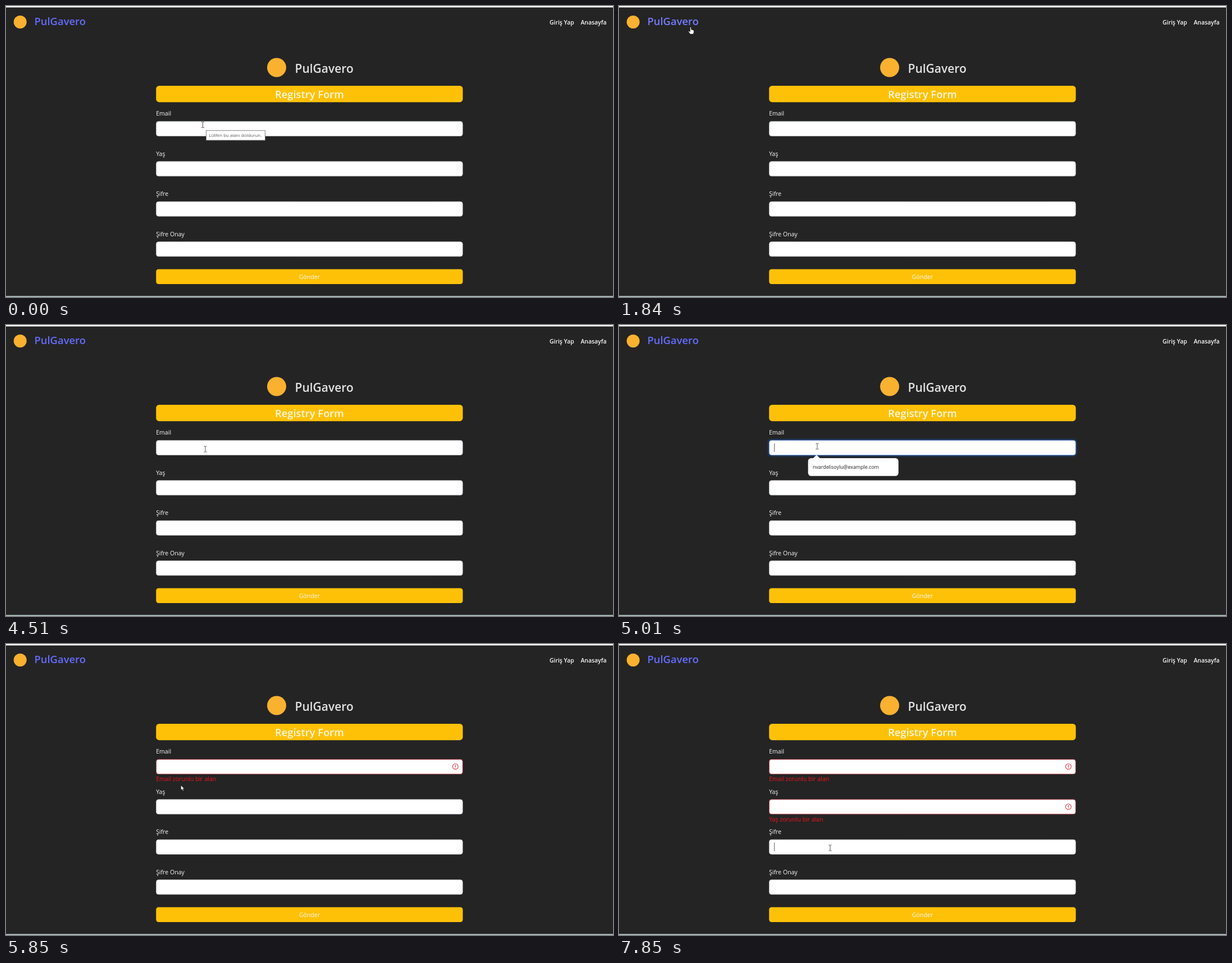
These frames come from a looping animation (1081x518 px, 8000 ms). An HTML page:

```html
<!DOCTYPE html>
<html lang="tr">
<head>
<meta charset="utf-8">
<title>Registry Form</title>
<style>
  html, body { margin: 0; width: 100%; height: 100%; overflow: hidden; background: #242424; }
  svg { display: block; width: 100%; height: 100%; }
  text { font-family: "Open Sans", "Noto Sans", sans-serif; font-size: 10.55px; fill: #f8f8f8; }
  .semi { font-weight: 600; }
  .mid { text-anchor: middle; }
  .error { fill: #f5121a; }
  .field { fill: #fff; stroke: #ced4da; stroke-width: .7; }
  .ring { fill: #1e3659; }
  .caret { stroke: #333; stroke-width: .8; }
  .bar { fill: #ffc107; }
  .coin { fill: #fbb130; }
</style>
</head>
<body>
<svg id="stage" viewBox="0 0 1081 518" preserveAspectRatio="none">
  <rect width="1081" height="518" fill="#242424"/>
  <rect width="1081" height="2.5" fill="#fff"/>
  <rect y="516" width="1081" height="2" fill="#a2b3b3"/>

  <circle class="coin" cx="25.2" cy="28.5" r="11.5"/>
  <text id="brand" class="semi" x="50.5" y="33.8" style="font-size:18.4px">PulGavero</text>
  <text class="semi" x="968" y="33" style="font-size:10.4px">Giriş Yap</text>
  <text class="semi" x="1023.5" y="33" style="font-size:10.4px">Anasayfa</text>

  <circle class="coin" cx="482" cy="109.5" r="17"/>
  <text class="semi" x="514.5" y="118.7" style="font-size:21px;fill:#e2e2e2">PulGavero</text>

  <rect class="bar" x="267.3" y="142" width="546.2" height="29.2" rx="5.5"/>
  <text class="semi mid" x="540.4" y="164.2" style="font-size:18.4px;fill:#fff8e0">Registry Form</text>

  <g id="form"></g>

  <rect class="bar" x="267.3" y="468.4" width="546.2" height="26.6" rx="4.2"/>
  <text class="mid" x="540.4" y="486.3">Gönder</text>

  <g id="tip">
    <rect x="356.5" y="221.7" width="105" height="17.3" fill="#fff" stroke="#767676" stroke-width=".9"/>
    <text x="361.3" y="233.3" style="font-size:7.95px;fill:#575757">Lütfen bu alanı doldurun.</text>
  </g>

  <g id="popup">
    <path d="M344.8 238l7-6.8 7 6.8z" fill="#fff"/>
    <rect x="336.7" y="237" width="161" height="31.8" rx="5.5" fill="#fff"/>
    <text x="345" y="256.2" style="font-size:8.85px;font-weight:500;fill:#1f1f1f">nvardelisoylu@example.com</text>
  </g>

  <g id="arrow" stroke-linejoin="round">
    <path d="M0 0V8.6L2 6.8 3.5 10 4.9 9.4 3.5 6.3H6.2Z" fill="#fff" stroke="#111" stroke-width=".6"/>
  </g>
  <g id="beam" fill="none" stroke="#444" stroke-width=".9">
    <path d="M-2.6 -5H-.6L0 -4.4 .6 -5H2.6M0 -4.4V4.4M-2.6 5H-.6L0 4.4 .6 5H2.6"/>
  </g>
  <g id="hand" stroke-linejoin="round">
    <path d="M-1 1Q0 -.8 1 1V4.6Q2 3.8 2.8 5 3.8 4.4 4.4 5.5 5.8 5.1 5.9 6.6V9.2L4.9 12.6H-.7L-3.8 8.2Q-3.9 6.6 -2.4 7.2L-1 8.4Z"
      fill="#fff" stroke="#111" stroke-width=".7"/>
  </g>
</svg>
<script>
const LOOP = 8000;
const $ = id => document.getElementById(id);

// start time, pointer kind, x, y
const pointer = [
  [0, "beam", 350.5, 211.5],
  [330, "arrow", 400, 325],
  [500, "arrow", 520, 394],
  [670, "arrow", 800, 200],
  [840, "hand", 1050, 30],
  [1000, "hand", 985, 31],
  [1170, "arrow", 400, 60],
  [1340, "arrow", 15, 25],
  [1500, "arrow", 2, 24],
  [1670, "hand", 75, 30],
  [1840, "hand", 127.5, 37.5],
  [2010, "arrow", 210, 250],
  [2180, "arrow", 430, 505],
  [2340, "arrow", 660, 440],
  [2510, "arrow", 512, 234],
  [2670, "arrow", 510, 96],
  [2840, "arrow", 440, 89],
  [3000, "arrow", 380, 130],
  [3170, "arrow", 320, 190],
  [3340, "beam", 337.5, 224.2],
  [3510, "beam", 345, 226],
  [3670, "arrow", 354.3, 237.5],
  [3840, "arrow", 355, 238.7],
  [4180, "arrow", 355.6, 239],
  [4510, "beam", 355, 221],
  [4680, "beam", 353, 216],
  [5180, "arrow", 332, 242],
  [5340, "arrow", 319, 255.7],
  [5510, "arrow", 312, 252.5],
  [5680, "arrow", 311.5, 251.5],
  [6010, "arrow", 325, 264],
  [6180, "beam", 345, 287],
  [6350, "beam", 346, 290],
  [6500, "beam", 338, 297],
  [6680, "arrow", 320, 317.5],
  [6850, "arrow", 319, 317.5],
  [7180, "arrow", 328, 322],
  [7350, "arrow", 350, 335],
  [7510, "beam", 370, 355],
  [7680, "beam", 376, 361],
  [7850, "beam", 376, 363]
];

// focus: caret appears; ring: glow appears; blur: both go; error: message appears
const rows = [
  { name: "Email", focus: 4680, ring: 4840, blur: 5680, error: 5680 },
  { name: "Yaş", focus: 6180, ring: 6350, blur: 6850, error: 6850 },
  { name: "Şifre", focus: 7850, ring: LOOP, blur: LOOP, error: LOOP },
  { name: "Şifre Onay", focus: LOOP, ring: LOOP, blur: LOOP, error: LOOP }
];

const box = (cls, y, grow = 0) =>
  `<rect class="${cls}" x="${267.6 - grow}" y="${y - grow}" width="${545.6 + 2 * grow}" height="${26 + 2 * grow}" rx="${4 + grow}"/>`;

$("form").innerHTML = rows.map((r, i) => {
  const y = 205.4 + i * 71.45;
  return `<text x="267.2" y="${y - 10}">${r.name}</text>
    <g id="ring${i}">${box("ring", y, 3)}</g>
    <g id="field${i}">${box("field", y)}</g>
    <path id="caret${i}" class="caret" d="M276.7 ${y + 5.2}v15.4"/>
    <g id="error${i}">
      <g fill="none" stroke="#dc3545" transform="translate(800.3 ${y + 12.8})">
        <circle r="4.9" stroke-width="1.1"/>
        <path d="M0 -2.7V.7M0 1.7V2.9" stroke-width="1.2"/>
      </g>
      <text class="error" x="267.2" y="${y + 39}">${r.name} zorunlu bir alan</text>
    </g>`;
}).join("");

const show = (id, on) => { $(id).style.display = on ? "" : "none"; };
const within = (t, a, b) => t >= a && t < b;

function draw(t) {
  const [, kind, x, y] = pointer.filter(p => p[0] <= t).pop();
  for (const k of ["arrow", "beam", "hand"]) show(k, k === kind);
  $(kind).setAttribute("transform", `translate(${x} ${y})`);

  show("tip", t < 330);
  show("popup", within(t, 4840, 5680));
  $("brand").style.fill = within(t, 1670, 2010) ? "#747bff" : "#646cff";

  rows.forEach((r, i) => {
    const ring = within(t, r.ring, r.blur);
    const bad = t >= r.error;
    const blinkOn = Math.floor((t - r.focus) / 530) % 2 === 0;
    show("ring" + i, ring);
    show("caret" + i, within(t, r.focus, r.blur) && blinkOn);
    show("error" + i, bad);
    $("field" + i).firstChild.style.stroke = ring ? "#86b7fe" : bad ? "#dc3545" : "#ced4da";
  });
}

const start = performance.now();
function tick() {
  draw((performance.now() - start) % LOOP);
  requestAnimationFrame(tick);
}
tick();
</script>
</body>
</html>
```
